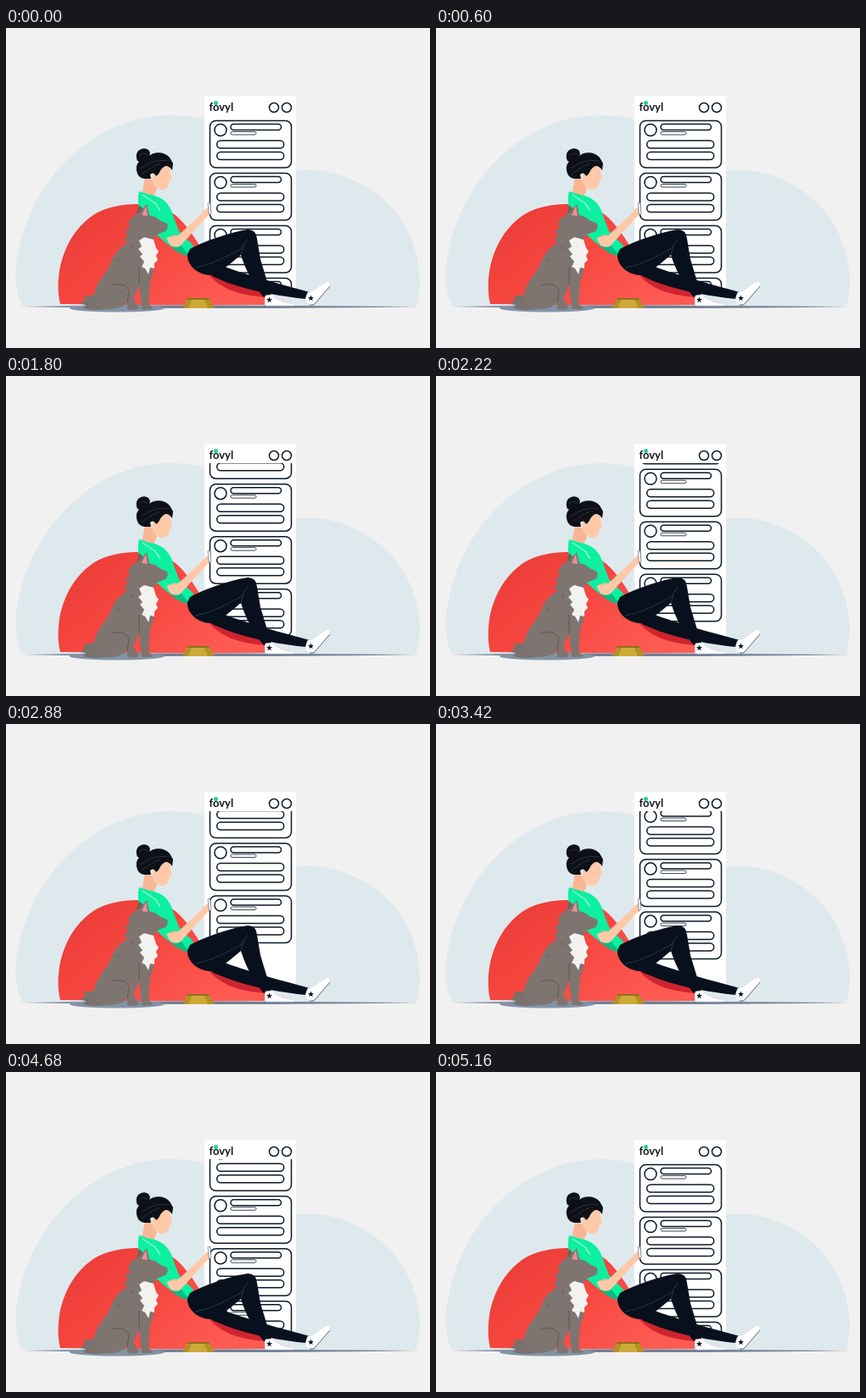
An HTML page for the animation above (5400 ms loop, 500 px wide and 378 px high).

```html
<!DOCTYPE html>
<html lang="en">
<head>
<meta charset="utf-8">
<title>Scrolling feed</title>
<style>
  html, body { margin: 0; width: 100%; height: 100%; overflow: hidden; background: #f1f1f1; }
  svg { display: block; width: 100%; height: 100%; }
  text { font: 700 13px Lato, sans-serif; fill: #15151d; }
  .line { fill: none; stroke: #0c1a28; stroke-width: 1.5; }
</style>
</head>
<body>
<svg viewBox="0 0 500 378">
  <defs>
    <linearGradient id="bag" x1="0" y1="0" x2="1" y2=".6">
      <stop offset="0" stop-color="#e83a37"/>
      <stop offset=".5" stop-color="#f6463f"/>
      <stop offset="1" stop-color="#fd5a52"/>
    </linearGradient>
    <clipPath id="view"><rect x="234" y="103" width="108" height="204"/></clipPath>
    <g id="card" class="line">
      <rect x="240.500" y=".5" width="96" height="55.500" rx="7"/>
      <circle cx="253" cy="11.500" r="7"/>
      <rect x="265" y="4.500" width="59.500" height="7" rx="3.500"/>
      <rect x="265" y="13.500" width="30" height="3.500" rx="1.700" stroke-width=".8"/>
      <rect x="248.700" y="24" width="79" height="9" rx="4.500"/>
      <rect x="248.700" y="37.500" width="79" height="9" rx="4.500"/>
    </g>
    <path id="star" d="M0-3.500 1-1 3.500-1 1.500.7 2.200 3.300 0 1.800-2.200 3.300-1.500.7-3.500-1-1-1Z" fill="#111827"/>
  </defs>

  <!-- backdrop -->
  <path fill="#dee9ed" d="M18 328C10 305 9 285 16 259C32 182 100 103 195 103C238 103 277 121 303 146C317 159 328 168 344 168C383 164 423 180 452 209C479 237 496 286 484 328Z"/>
  <path fill="#718096" d="M17 329Q130 327 250 327.500T489 329Q380 331 250 331T17 329Z"/>
  <ellipse cx="131" cy="331" rx="56" ry="4.500" fill="#8293a8"/>

  <!-- feed -->
  <path fill="#fff" d="M234 80H342V309H234Z"/>
  <text x="239.500" y="98">fovyl</text>
  <circle cx="247.500" cy="88.500" r="2.500" fill="#1fd3a0"/>
  <g class="line">
    <circle cx="316" cy="94" r="5.500"/>
    <circle cx="331" cy="94" r="5.500"/>
  </g>
  <g clip-path="url(#view)"><g id="list"></g></g>

  <!-- bean bag -->
  <path fill="url(#bag)" d="M64 326C61 315 61 300 63 287C68 258 84 231 108 218C133 205 178 203 201 222C221 240 231 265 246 281C266 295 299 304 306 317L305 327Q180 328 64 326Z"/>
  <path fill="#cf2430" d="M226 270C240 301 262 315 306 318L303 308 262 288Z"/>

  <!-- far leg and shoe -->
  <path fill="#07101c" d="M232 270C249 281 291 293 325 303L358 312 354 320C322 317 278 309 250 296Q232 290 232 270Z"/>
  <path fill="#fff" stroke="#d4d8df" stroke-width=".6" d="M356 312Q364 311 369 305L379 299Q383 300 382 305L364 326Q360 329 354 325Q352 319 356 312Z"/>
  <use href="#star" x="359.500" y="319"/>
  <path fill="none" stroke="#2a3342" stroke-width=".7" d="M382 305 364 326Q361 328 358 327"/>

  <!-- neck, face, shirt -->
  <path fill="#f9b694" d="M164 176 176 181 178 190 174 199 160 196 162 187Z"/>
  <path fill="#ffc9a8" d="M176 165 193 161 194 171 196 178 193 180 192 186Q189 192 182 191L174 185Q171 174 176 165Z"/>
  <path fill="#0cf0a0" d="M157 193Q166 196 175 198C189 202 194 211 198 224L204 240 221 257 217 270C199 265 186 251 174 241C159 228 153 208 157 193Z"/>
  <path fill="#06bd83" d="M196 253 207 257 217 270C207 268 199 263 192 256Z"/>
  <path fill="none" stroke="#8affd8" stroke-width="1.500" d="M161 197 176 207 182 216"/>

  <!-- arm and phone -->
  <path fill="#f9b694" d="M191 247 200 244 208 247 205 257 196 257Z"/>
  <path fill="#ffc9a8" d="M189 248 202 246 229 221 235 214 241 211 241 219 235 225 205 258Q199 260 194 257Z"/>
  <path fill="#fff" stroke="#49505c" stroke-width=".6" d="M238 207 240.500 206 242 219 239.500 221Z"/>

  <!-- hair -->
  <g fill="#0d1017">
    <path d="M155 157Q152 150 156 145Q162 140 168 144Q172 149 167 155Q163 161 155 157Z"/>
    <path d="M155 172C151 161 157 155 167 153C174 145 187 146 193 153L197 160 196 168Q190 160 185 165C181 168 181 173 177 175Q174 169 170 173L171 178 163 178Q157 177 155 172Z"/>
  </g>
  <path fill="none" stroke="#344052" stroke-width=".7" d="M159 166Q174 154 192 157M160 173Q173 163 182 160M157 151Q162 146 167 150"/>

  <!-- near leg and shoe -->
  <path fill="#07101c" d="M217 261C236 251 265 241 285 238Q295 238 296 249L300 273 313 316 304 318C291 303 282 284 277 268C262 280 252 291 239 292C224 290 213 279 214 267Z"/>
  <path fill="none" stroke="#344052" stroke-width=".8" d="M223 283C243 280 261 269 277 261L285 249M277 268 280 258"/>
  <path fill="#fff" stroke="#d4d8df" stroke-width=".6" d="M306 316 314 315Q323 322 337 323Q341 325 340 328H307Q304 322 306 316Z"/>
  <path fill="#e6dfe8" d="M314 316Q323 322 337 323L339 326Q324 326 314 316Z"/>
  <use href="#star" x="310.500" y="321"/>

  <!-- dog -->
  <path fill="#7a716c" d="M114 313C101 313 101 319 96 315L91 319 94 321 87 326 94 327 91 331Q105 335 125 331Z"/>
  <path fill="#6a6360" d="M153 225 157 209 167 219 170 232Z"/>
  <path fill="#7e7570" d="M144 230 149 223 156 219 166 208 169 221Q178 223 181 227L190 231Q192 236 188 240L178 244 171 253 174 271Q176 288 170 299L168 326 174 331Q171 333 160 332L157 304 150 319 157 331Q153 334 143 332L143 324Q136 332 122 332Q104 332 104 316C105 301 116 293 123 279C127 267 133 260 143 254L139 249 144 245 140 239 146 237Z"/>
  <path fill="#ee8f93" d="M160 221 165 210 167 222Z"/>
  <path fill="none" stroke="#5f5753" d="M124 304Q139 299 145 310L143 324M157 304 157 282M130 273 133 277M148 257 151 262"/>
  <path fill="#f2f2f1" d="M157 251 163 247 174 250 177 260 180 264 177 269 179 274 175 278 175 284 170 283 168 291 164 284 160 282 163 276 158 270 161 267 156 261 160 258Z"/>

  <!-- bowl -->
  <path fill="#b39127" d="M214 319H239L246 331H208Z"/>
  <path fill="#cda938" d="M219 321H234L238 331H215Z"/>
  <path fill="#8f701b" d="M214 319H239L240 321H213Z"/>
</svg>
<script>
const LOOP = 5400, PITCH = 62, PULL_TOP = 18, PULL_END = 40.6;
const list = document.getElementById('list');
list.innerHTML = [0, 1, 2, 3].map(i => `<use href="#card" y="${109 + i * PITCH}"/>`).join('');

const span = (t, from, to) => Math.min(1, Math.max(0, (t - from) / (to - from)));
const smooth = u => u * u * (3 - 2 * u);
const quart = u => u < .5 ? 8 * u ** 4 : 1 - 8 * (1 - u) ** 4;

// Bounce at the top, scroll to the end, overshoot, then scroll back.
function scrollAt(t) {
  const topBounce = PULL_TOP * Math.sin(Math.PI * span(t, 0, 600)) ** 2;
  const endBounce = PULL_END * (smooth(span(t, 2570, 3030)) - smooth(span(t, 3030, 3630)));
  const travel = quart(span(t, 810, 2570)) - smooth(span(t, 4050, 5160));
  return topBounce - endBounce - PITCH * travel;
}

function draw(now) {
  const t = Math.floor(now % LOOP / 30) * 30;
  list.setAttribute('transform', `translate(0 ${scrollAt(t).toFixed(2)})`);
  requestAnimationFrame(draw);
}
requestAnimationFrame(draw);
</script>
</body>
</html>
```
